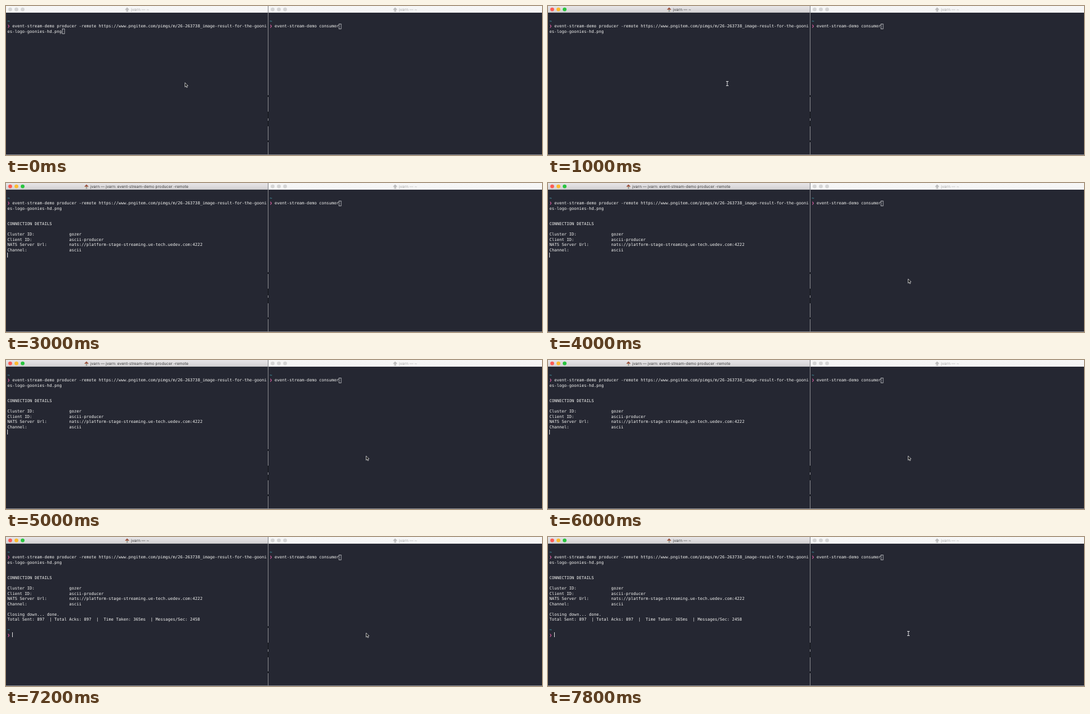
Animation of 870x244 px, one loop 8 s. Source, as an HTML page with a canvas:

```html
<!DOCTYPE html>
<html>
<head>
<meta charset="utf-8">
<style>
html, body { margin: 0; width: 870px; height: 244px; overflow: hidden; }
canvas { display: block; }
</style>
</head>
<body>
<canvas id="stage" width="870" height="244"></canvas>
<script>
const ctx = document.getElementById('stage').getContext('2d');
const LOOP = 8000, CELL = 4.013, ROW = 8.5;
const MONO = '6.667px "DejaVu Sans Mono", monospace';
const SANS = '6.4px Inter, sans-serif';
const USER = 'jvarn';
const LEFT = 2.3, RIGHT = 428;
const TEXT = '#f4f4f2', CYAN = '#55d3e4', PINK = '#ff69b8';

const command = [
  'event-stream-demo producer -remote https://www.pngitem.com/pimgs/m/26-263738_image-result-for-the-gooni',
  'es-logo-goonies-hd.png'
];
const details = [
  ['Cluster ID:', 'gozer'],
  ['Client ID:', 'ascii-producer'],
  ['NATS Server Url:', 'nats://platform-stage-streaming.ue-tech.uedev.com:4222'],
  ['Channel:', 'ascii']
];
const totals = 'Total Sent: 897  | Total Acks: 897  |  Time Taken: 365ms  | Messages/Sec: 2458';
const cursorOff = [[1000, 2000], [2400, 3000], [4400, 5000], [5400, 6000]];

function rect(x, y, w, h, color) {
  ctx.fillStyle = color;
  ctx.fillRect(x, y, w, h);
}

function path(points, fill, stroke, width = 0.7) {
  ctx.beginPath();
  points.forEach(([x, y]) => ctx.lineTo(x, y));
  ctx.closePath();
  if (fill) { ctx.fillStyle = fill; ctx.fill(); }
  if (stroke) { ctx.strokeStyle = stroke; ctx.lineWidth = width; ctx.stroke(); }
}

// Terminal text; row 0 is the first command line
function print(x0, col, row, text, color = TEXT) {
  ctx.font = MONO;
  ctx.fillStyle = color;
  ctx.fillText(text, x0 + col * CELL, 35.3 + row * ROW);
}

function prompt(x0, row) {
  print(x0, 0, row - 1, '~', CYAN);
  print(x0, 0, row, '❯', PINK);
}

function cursor(x0, col, row, focused) {
  const x = Math.round(x0 + col * CELL), y = Math.round(28.6 + row * ROW);
  if (focused) return rect(x, y, 1, 8, '#d4d4d4');
  ctx.strokeStyle = '#bfc0c4';
  ctx.lineWidth = 0.8;
  ctx.strokeRect(x + 0.5, y + 0.5, 3.5, 8);
}

function house(x, focused) {
  ctx.save();
  ctx.translate(x, 2);
  ctx.globalAlpha = focused ? 1 : 0.5;
  rect(1.3, 3.2, 4.6, 4.1, focused ? '#d9cdb8' : '#c4c4c4');
  rect(2.9, 4.6, 1.5, 2.7, focused ? '#6f7f93' : '#888');
  path([[0, 3.9], [3.6, 0.3], [7.2, 3.9]], focused ? '#9a5340' : '#858585');
  ctx.restore();
}

function titleBar(x, w, title, titleX, focused) {
  const shade = ctx.createLinearGradient(0, 0, 0, 11);
  shade.addColorStop(0, focused ? '#e8e6e8' : '#f7f7f7');
  shade.addColorStop(1, focused ? '#d2d0d2' : '#f4f4f4');
  rect(x, 0, w, 11, shade);
  rect(x, 10.5, w, 0.5, focused ? '#aaa' : '#d5d5d5');
  const dots = focused ? ['#fc5b54', '#fdbb2d', '#29c53f'] : Array(3).fill('#d5d5d5');
  dots.forEach((color, i) => {
    ctx.fillStyle = color;
    ctx.beginPath();
    ctx.arc(x + 6.8 + i * 10.1, 5.5, 3.1, 0, 7);
    ctx.fill();
  });
  house(titleX, focused);
  ctx.font = SANS;
  ctx.fillStyle = focused ? '#3c3c3c' : '#a8a8a8';
  ctx.fillText(title, titleX + 10, 8);
}

function arrow(x, y) {
  const shape = [[0, 0], [0, 7], [1.6, 5.5], [2.7, 8], [3.9, 7.5], [2.8, 5.1], [4.9, 5]];
  path(shape.map(([a, b]) => [x + a, y + b]), '#111', '#eee');
}

function beam(x, y) {
  rect(x - 0.5, y - 3.5, 1, 7, '#d8d8da');
  for (const edge of [-4, 3]) rect(x - 2, y + edge, 4, 1, '#d8d8da');
}

function pointer(t) {
  if (t < 1000) arrow(290.5, 125.6);
  else if (t < 3000) beam(291, 127);
  else if (t < 3400) return;
  else if (t < 3600) arrow(556.5, 161);
  else if (t < 7800) arrow(584.5, 157);
  else beam(585, 158);
}

function leftWindow(t) {
  const focused = t >= 1000, running = t >= 3000 && t < 7200;
  const title = `${USER} — ` + (running ? `${USER}: event-stream-demo producer -remote` : '~');
  titleBar(0, 425, title, running ? 127 : 193, focused);

  prompt(LEFT, 0);
  print(LEFT, 2, 0, command[0]);
  print(LEFT, 0, 1, command[1]);
  let at = [22, 1];
  if (t >= 3000) {
    print(LEFT, 0, 4, 'CONNECTION DETAILS');
    details.forEach(([key, value], i) => print(LEFT, 0, 6 + i, key.padEnd(25) + value));
    at = [0, 10];
  }
  if (t >= 6200) {
    print(LEFT, 0, 11, 'Closing down... ' + (running ? '' : 'done.'));
    at = [16, 11];
  }
  if (t >= 7200) {
    print(LEFT, 0, 12, totals);
    prompt(LEFT, 15);
    at = [2, 15];
  }
  if (!cursorOff.some(([a, b]) => t >= a && t < b)) cursor(LEFT, ...at, focused);
}

function rightWindow() {
  titleBar(426, 444, `${USER} — ~`, 628, false);
  prompt(RIGHT, 0);
  print(RIGHT, 2, 0, 'event-stream-demo consumer');
  cursor(RIGHT, 28, 0, false);
}

function backdrop() {
  rect(0, 0, 870, 244, '#252732');
  rect(425, 0, 1, 244, '#85868b');
  for (const [y, h] of [[146, 3], [173, 11], [188, 9], [220, 3]]) rect(425, y, 1, h, '#15161c');
  rect(0, 243, 870, 1, '#8b8c92');
}

function draw(now) {
  const t = now % LOOP;
  ctx.textRendering = 'geometricPrecision';
  backdrop();
  leftWindow(t);
  rightWindow();
  pointer(t);
  requestAnimationFrame(draw);
}
requestAnimationFrame(draw);
</script>
</body>
</html>
```
